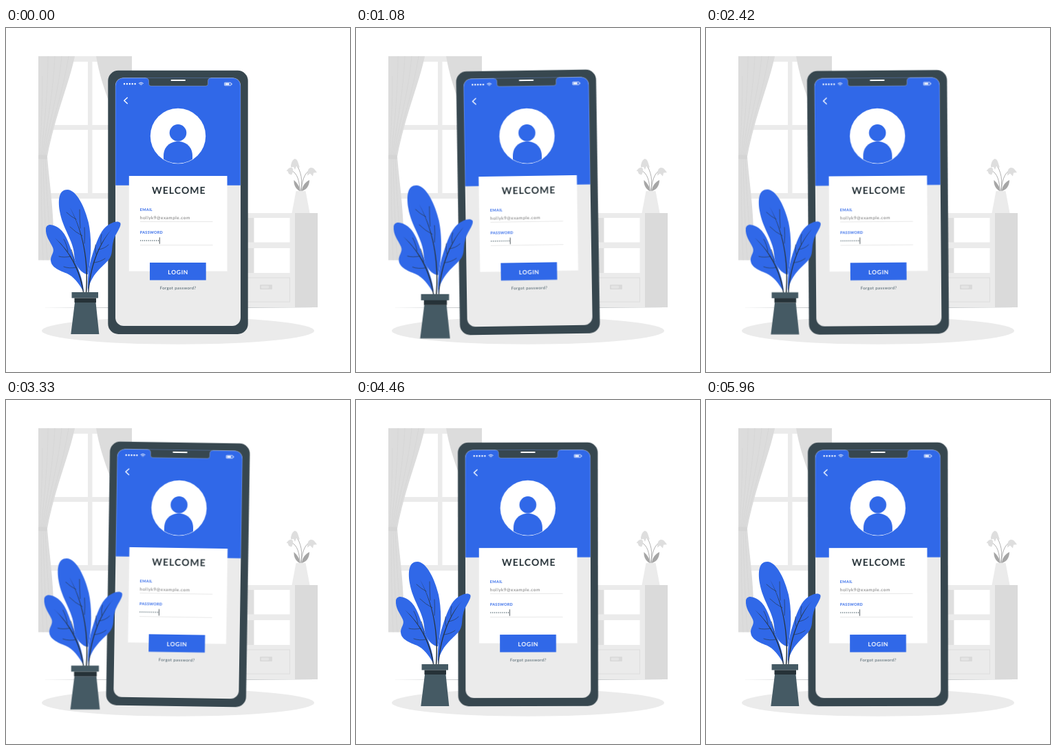
An HTML page for the animation above (6 s loop, 500x500 px).

```html
<!DOCTYPE html>
<html lang="en">
<head>
<meta charset="utf-8">
<title>Login scene</title>
<style>
  html, body { margin: 0; width: 100%; height: 100%; overflow: hidden; background: #fff; }
  svg { display: block; width: 100%; height: 100%; }
  :root { --blue: #3068e8; --slate: #37474f; --ink: #263238; }

  .phone { transform-origin: 250px 253.5px; animation: sway 1.5s linear infinite; }
  .plant { transform-origin: 112.5px 340px; animation: pulse 6s linear infinite; }

  @keyframes sway {
    25% { transform: rotate(1deg); }
    75% { transform: rotate(-1deg); }
  }
  @keyframes pulse {
    0%, 30%, 40%, 60%, 100% { transform: scale(1); }
    10%, 50% { transform: scale(1.1); }
  }

  text { font-family: Lato, "Open Sans", sans-serif; text-rendering: geometricPrecision; }
  .title { font-size: 14px; font-weight: 700; letter-spacing: 1.05px; fill: var(--ink); }
  .label { font-size: 5.5px; font-weight: 700; letter-spacing: .3px; fill: var(--blue); }
  .value { font-size: 6.4px; letter-spacing: .55px; fill: #737373; }
  .login { font-size: 8.5px; font-weight: 700; letter-spacing: .7px; fill: #fff; }
  .forgot { font-size: 6px; letter-spacing: .4px; fill: #455a64; }

  .blue { fill: var(--blue); }
  .slate { fill: var(--slate); }
  .line { fill: none; stroke-linecap: round; stroke-linejoin: round; }
  .white { stroke: #fff; }
  .vein { stroke: var(--ink); stroke-width: .6; }
  .fold { stroke: #d0d0d0; stroke-width: .5; }
</style>
</head>
<body>
<svg viewBox="0 0 500 500">
  <defs>
    <clipPath id="screen"><rect x="159" y="72.5" width="182" height="360.5" rx="12"/></clipPath>
    <clipPath id="face"><circle cx="250" cy="157" r="39.8"/></clipPath>
  </defs>

  <!-- window -->
  <g fill="#ebebeb">
    <rect x="47" y="41" width="136" height="8"/>
    <rect x="119" y="41" width="6.5" height="207"/>
    <rect x="50" y="141" width="133" height="7"/>
    <rect x="50" y="240" width="133" height="8"/>
  </g>
  <g fill="#dcdcdc">
    <path d="M47 41H100C92 80 71 128 60 187C62 215 67 245 69 290L70 337.5H47Z"/>
    <path d="M131 41H183V150H166C156 120 139 88 131 41Z"/>
  </g>
  <g class="line fold">
    <path d="M91 41C84 88 66 140 57 185"/>
    <path d="M81 41C77 90 62 142 55 185"/>
    <path d="M71 41C69 92 59 142 53 185"/>
    <path d="M61 41C61 92 56 140 51 185"/>
    <path d="M53 70C53 110 51 150 49 185"/>
    <path d="M57 190C59 240 63 292 66 337"/>
    <path d="M54 190C55 240 57 292 60 337"/>
    <path d="M51 190C51 240 52 292 54 337"/>
  </g>
  <rect x="47" y="184.5" width="12.5" height="6" rx="1" fill="#d4d4d4"/>

  <!-- cabinet -->
  <rect x="330" y="269" width="90" height="137" fill="#ebebeb"/>
  <rect x="420" y="269" width="33" height="137" fill="#dadada"/>
  <g fill="#dfdfdf">
    <rect x="340" y="276" width="21" height="35.5"/>
    <rect x="340" y="320" width="21" height="36"/>
  </g>
  <g fill="#fff">
    <rect x="360.5" y="276" width="52" height="35.5"/>
    <rect x="360.5" y="320" width="52" height="36"/>
  </g>
  <rect x="330" y="363" width="82.5" height="35" fill="none" stroke="#dedede"/>
  <rect x="369" y="373" width="18" height="7" rx="1" fill="#dadada"/>
  <rect x="371" y="374.5" width="11" height="4" rx="1" fill="#e4e4e4"/>

  <!-- vase -->
  <g class="line" stroke="#a6a6a6" stroke-width=".9">
    <path d="M428 238C432 222 429 208 421 197"/>
    <path d="M427 238C427 224 424 210 414 207"/>
    <path d="M429 238C430 224 433 210 443 206"/>
  </g>
  <g fill="#a6a6a6">
    <path d="M427 237C421 234 418 228 418.500 221C424 226 427 231 427 237Z"/>
    <path d="M430 237C430 230 435 224 441 221C441 229 437 235 430 237Z"/>
  </g>
  <g fill="#dedede">
    <path d="M419 190.500C422 189.500 424 193 425 197L427 203L422 201L420 206L418 202L414 202.500C414 197 416 192 419 190.500Z"/>
    <path d="M416 203.500C418.500 206 417 210 415 213.500L411 212L409.500 208L407.500 208C410 204 413 202 416 203.500Z"/>
    <path d="M443 203C447 202.500 449 206 452 210L447 210.500L446 215.500L442 211.500L438 214.500C438 208 439 204 443 203Z"/>
  </g>
  <path d="M421.5 237H435.5L441.500 269H415.500Z" fill="#ebebeb"/>

  <!-- floor -->
  <path d="M48 406.5L250 406.2L453 406.5L250 406.8Z" fill="#263238"/>
  <ellipse cx="250" cy="440" rx="198" ry="19.7" fill="#ebebeb"/>

  <g class="phone">
    <rect class="slate" x="148.3" y="61.800" width="203.4" height="383.2" rx="15"/>
    <g clip-path="url(#screen)">
      <rect x="159" y="72" width="182" height="362" fill="#ebebeb"/>
      <rect class="blue" x="159" y="72" width="182" height="156.7"/>
      <path class="slate" d="M203 71H298V72.5Q293.5 73 293.5 77V81Q293.5 84.3 290 84.3H211Q207.5 84.3 207.5 81V77Q207.5 73 203 72.5Z"/>
    </g>
    <path class="line white" stroke-width=".4" opacity=".6" d="M159.2 228.7V84.5Q159.2 72.7 171 72.7H203Q207.5 73 207.5 77V81Q207.5 84.3 211 84.3H290Q293.5 84.3 293.5 81V77Q293.5 73 298 72.7H329Q340.8 72.7 340.8 84.5V228.7"/>
    <path class="line white" stroke-width="2" d="M240.5 76H260"/>

    <!-- status bar -->
    <path class="line white" stroke-width="2.4" stroke-dasharray="0 3.9" d="M172 81.2H188"/>
    <g class="line white" stroke-width=".9">
      <path d="M193.2 80.3Q196.3 77.7 199.4 80.3M194.6 81.7Q196.3 80.2 198 81.7"/>
      <path d="M196.3 82.9V83"/>
    </g>
    <rect x="317.5" y="79.3" width="9.5" height="4.4" rx=".8" fill="none" stroke="#fff" stroke-width=".7"/>
    <path d="M318.5 80.3H324.5V82.7H318.5ZM327.5 80.5H328.5V82.5H327.5Z" fill="#fff"/>
    <path class="line white" stroke-width="1.4" d="M176.3 101.2L171.700 105.5L176.3 109.8"/>

    <!-- avatar -->
    <circle cx="250" cy="157" r="40.2" fill="#fff"/>
    <g class="blue" clip-path="url(#face)">
      <circle cx="250" cy="152.4" r="12.3"/>
      <path d="M229 200V186C229 173 238 165 250 165S271 173 271 186V200Z"/>
    </g>

    <!-- form -->
    <rect x="178.8" y="215" width="142.7" height="138.5" fill="#fff"/>
    <text class="title" x="212" y="241">WELCOME</text>
    <text class="label" x="194.8" y="265.8">EMAIL</text>
    <text class="value" x="194.8" y="278.4">hollyk9@example.com</text>
    <text class="label" x="194.8" y="299.2">PASSWORD</text>
    <path d="M195 281.5H300.5M195 315.5H300.5" stroke="#d8d8d8" stroke-width=".6"/>
    <path class="line" stroke="#455a64" stroke-width="1.5" stroke-dasharray="0 2.85" d="M195.8 309H222"/>
    <path d="M223.3 304.3V313.8" stroke="#263238" stroke-width=".8"/>
    <rect class="blue" x="209" y="341" width="81.7" height="25.5"/>
    <text class="login" x="235.3" y="357.5">LOGIN</text>
    <text class="forgot" x="223.7" y="380">Forgot password?</text>
  </g>

  <g class="plant">
    <g class="blue">
      <path d="M117 358C106 354 100 343 99 329C98 309 82 291 78 266C75 247 78 235 89 235C103 235 115 262 120 283C124 302 125 330 119 358Z"/>
      <path d="M113 384C106 371 98 361 88 356.5C76 352 65 347 65 337C65 330 71 326 68 319C64 310 57 303 58 291C60 283 70 286 77 291C89 300 93 319 98 331C104 348 112 364 113 384Z"/>
      <path d="M119 384C118 365 120 345 126 328C131 312 137 296 145 289C152 283 162 279 166 283C169 288 158 300 156 310C153 320 156 329 149 337C142 346 122 358 119 384Z"/>
    </g>
    <!-- tapered midribs -->
    <g fill="#263238">
      <path d="M115.800 385C118.500 350 116 305 93 261C117 304 120 350 117.300 385Z"/>
      <path d="M112 385C108 357 95 328 71 305C96 327 110 357 113.200 385Z"/>
      <path d="M119.300 385C121 350 133 315 154 292C134 316 122.500 350 120.500 385Z"/>
    </g>
    <g class="line vein">
      <path d="M108 291Q107 277 107 264M114 313Q115 301 114 290M102 278Q94 274 88 268M111 302Q101 297 93 289"/>
      <path d="M90 325Q88 314 84 307M99 340Q98 329 95 322M94 332Q84 334 77 332M102 348Q92 350 84 347"/>
      <path d="M138 314Q137 306 139 300M131 329Q129 321 130 315M134 322Q143 321 149 315M128 341Q137 340 144 335"/>
    </g>
    <path d="M95.5 384H134V392.5H95.5ZM100 399H130.5L135.3 445H94.3Z" fill="#455a64"/>
    <rect x="99.5" y="392.5" width="31.5" height="6.5" fill="#263238"/>
  </g>
</svg>
</body>
</html>
```
